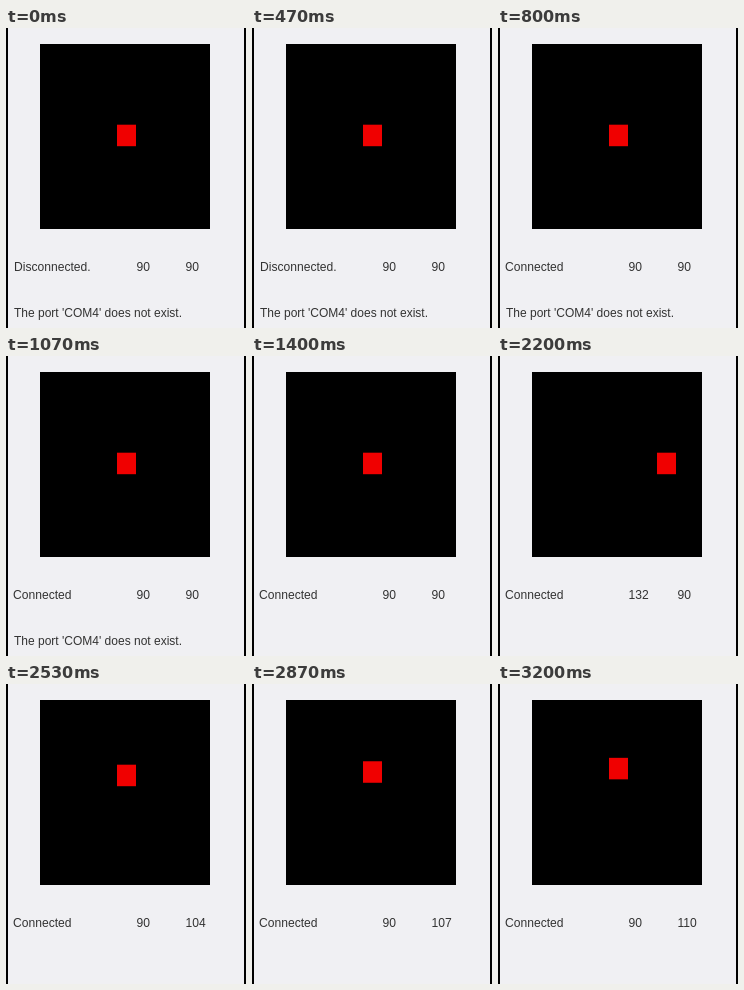
Write an HTML page that moves like this. It is 240 px wide and 300 px high and loops after 3.27 s.

```html
<!DOCTYPE html>
<html lang="en">
<head>
<meta charset="utf-8">
<title>Joystick monitor</title>
<style>
  html, body { margin: 0; width: 100%; height: 100%; overflow: hidden; background: #f0f0f3; }
  svg { display: block; width: 240px; height: 300px; }
  text { font: 12.1px "Liberation Sans", Arial, sans-serif; fill: #333; }
</style>
</head>
<body>
<svg viewBox="0 0 240 300">
  <rect width="240" height="300" fill="#f0f0f3"/>
  <rect width="2" height="300"/>
  <rect x="238" width="2" height="300"/>
  <rect x="34" y="16" width="170" height="185"/>
  <rect id="dot" width="19" height="21.5" fill="#f00000"/>
  <text id="status" y="243"></text>
  <text id="pan" x="130.5" y="243"></text>
  <text id="tilt" x="179.5" y="243"></text>
  <text id="error" x="8" y="289" style="font-size:12px">The port 'COM4' does not exist.</text>
</svg>
<script>
const LOOP = 3270, FPS = 15, CENTER = 90, SCALE = 1.143;
const CONNECT = 730, RECEIVE = 1400;

// [time in ms, angle]
const panKeys = [[0, 90], [1440, 90], [1733, 106], [2200, 132], [2400, 90]];
const tiltKeys = [[0, 90], [2270, 90], [2533, 104], [3200, 110]];

const el = id => document.getElementById(id);
const dot = el("dot"), status = el("status");
const statusText = status, pan = el("pan"), tilt = el("tilt"), error = el("error");

function angleAt(keys, t) {
  const next = keys.findIndex(k => k[0] > t);
  if (next < 0) return keys[keys.length - 1][1];
  const [t0, a] = keys[next - 1], [t1, b] = keys[next];
  return Math.round(a + (b - a) * (t - t0) / (t1 - t0));
}

function draw(now) {
  // Readings refresh at a fixed rate.
  const step = Math.floor((now % LOOP + 4) * FPS / 1000);
  const t = step * 1000 / FPS;
  const a = angleAt(panKeys, t), b = angleAt(tiltKeys, t);
  const connected = t >= CONNECT;

  dot.setAttribute("x", 111 + (a - CENTER) * SCALE);
  dot.setAttribute("y", 96.7 - (b - CENTER) * SCALE);
  statusText.textContent = connected ? "Connected" : "Disconnected.";
  statusText.setAttribute("x", connected ? 7 : 8);
  pan.textContent = a;
  tilt.textContent = b;
  error.setAttribute("visibility", t < RECEIVE ? "visible" : "hidden");
}

const start = performance.now();
function tick() {
  draw(performance.now() - start);
  requestAnimationFrame(tick);
}
tick();
</script>
</body>
</html>
```
